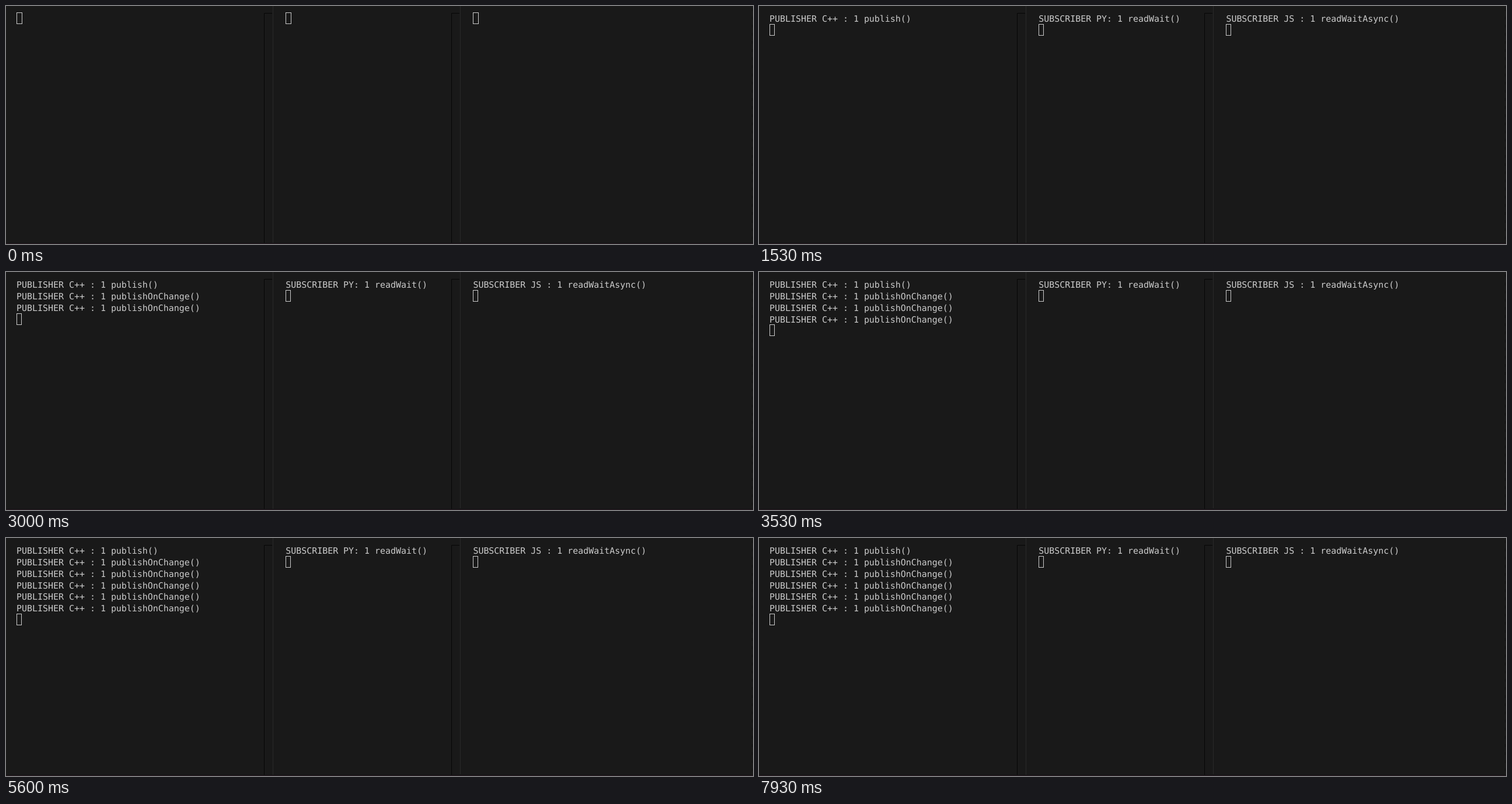
Write an HTML page that moves like this. It is 1280 by 409 pixels and loops after 8 s.

```html
<!DOCTYPE html>
<html lang="en">
<head>
<meta charset="utf-8">
<title>Publisher and subscribers</title>
<style>
  html, body { margin: 0; width: 100%; height: 100%; overflow: hidden; background: #191919; }
  svg { display: block; width: 1280px; height: 409px; }
  text {
    font: 14.95px "DejaVu Sans Mono", monospace;
    fill: #cccccc;
    white-space: pre;
    text-rendering: geometricPrecision;
  }
  .cursor { fill: none; stroke: #cccccc; stroke-width: 1; }
</style>
</head>
<body>
<svg id="stage" viewBox="0 0 1280 409">
  <rect width="1280" height="409" fill="#191919"/>
  <path d="M442.5 409V12.5H456M763.5 409V12.5H777" fill="none" stroke="#060606"/>
  <path d="M457.5 0V409M778.5 0V406" fill="none" stroke="#292929"/>
  <path d="M1278.5 4V405" fill="none" stroke="#101010" stroke-dasharray="5 9"/>
  <path d="M0 407.5H1280" stroke="#121214"/>
  <path d="M0 408.5H1280" stroke="#2b1d25"/>
</svg>
<script>
const LOOP = 8000, ROW = 19.85, BASELINE = 27;
const FIRST_LINE = 1500, NEXT_LINE = 2500, INTERVAL = 500;
const stage = document.getElementById("stage");

function add(tag, attrs, content = "") {
  const node = document.createElementNS("http://www.w3.org/2000/svg", tag);
  for (const name in attrs) node.setAttribute(name, attrs[name]);
  node.textContent = content;
  stage.append(node);
  return node;
}

function makePane(x, lines) {
  return {
    x,
    rows: lines.map((line, i) => add("text", { x, y: BASELINE + i * ROW }, line)),
    cursor: add("rect", { class: "cursor" })
  };
}

const changes = Array(5).fill("PUBLISHER C++ : 1 publishOnChange()");
const panes = [
  makePane(18, ["PUBLISHER C++ : 1 publish()", ...changes]),
  makePane(479.2, ["SUBSCRIBER PY: 1 readWait()"]),
  makePane(800.4, ["SUBSCRIBER JS : 1 readWaitAsync()"])
];

function linesAt(time) {
  if (time < FIRST_LINE) return 0;
  return 1 + Math.max(0, Math.floor((time - NEXT_LINE) / INTERVAL) + 1);
}

function render(time) {
  const printed = linesAt(time);
  for (const { x, rows, cursor } of panes) {
    const count = Math.min(printed, rows.length);
    rows.forEach((row, i) => row.setAttribute("visibility", i < count ? "visible" : "hidden"));
    cursor.setAttribute("x", Math.floor(x) + 0.5);
    cursor.setAttribute("y", Math.round(12 + count * ROW) - 0.5);
    cursor.setAttribute("width", count ? 8 : 9);
    cursor.setAttribute("height", 19);
  }
}

const start = performance.now();
function frame() {
  render((performance.now() - start) % LOOP);
  requestAnimationFrame(frame);
}
render(0);
requestAnimationFrame(frame);
</script>
</body>
</html>
```
